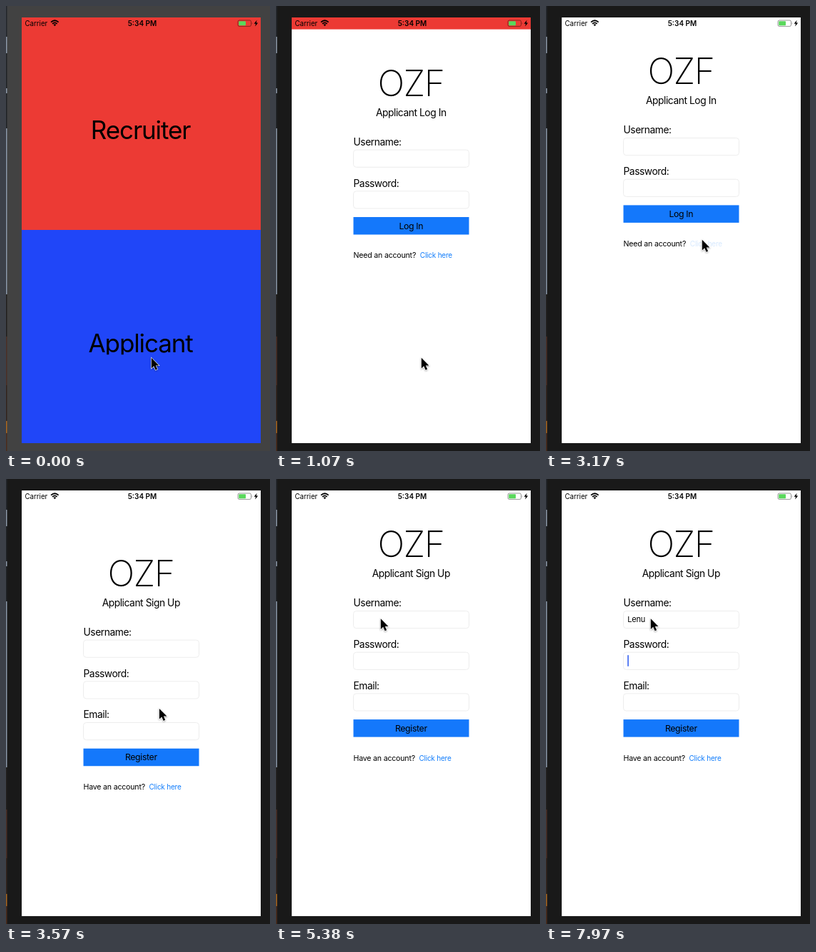
Write an HTML page that moves like this. It is 370x622 px and loops after 8 s.

```html
<!DOCTYPE html>
<html lang="en">
<head>
<meta charset="utf-8">
<title>Sign up flow</title>
<style>
  html, body { margin: 0; width: 100%; height: 100%; overflow: hidden; background: #191919; }
  svg { display: block; width: 370px; height: 622px; }
  text { font-family: Inter, "Open Sans", sans-serif; font-optical-sizing: none; fill: #000; white-space: pre; }
  .mid { text-anchor: middle; }
  .huge { font-size: 35px; letter-spacing: -1.1px; }
  .logo { font-size: 50px; font-weight: 200; letter-spacing: -1.5px; }
  .label { font-size: 13.8px; letter-spacing: -.44px; }
  .action { font-size: 12.3px; letter-spacing: -.35px; }
  .note { font-size: 10.6px; letter-spacing: -.2px; }
  .link { font-size: 10px; letter-spacing: -.22px; fill: #147efb; }
  .typed { font-size: 11px; letter-spacing: -.2px; }
  .status { font-size: 9.7px; }
  .clock { font-size: 10px; font-weight: 600; }
</style>
</head>
<body>
<svg viewBox="0 0 370 622">
  <defs>
    <clipPath id="screen"><rect x="22" y="16" width="335" height="595"/></clipPath>
    <clipPath id="half"><rect x="22" y="440" width="335" height="47.3"/></clipPath>
    <filter id="shade" x="-50%" y="-50%" width="200%" height="200%">
      <feDropShadow dx="0" dy="1" stdDeviation=".9" flood-opacity=".4"/>
    </filter>
  </defs>
  <rect id="bezel" width="370" height="622"/>
  <g id="strip"></g>
  <g clip-path="url(#screen)">
    <rect x="22" y="16" width="335" height="297.5" fill="#ec3a34"/>
    <rect x="22" y="313" width="335" height="298" fill="#2046f8"/>
    <text class="huge mid" x="188.6" y="186">Recruiter</text>
    <g clip-path="url(#half)"><text id="applicant" class="huge mid" x="188.6" y="484">Applicant</text></g>
    <g id="login"></g>
    <g id="signup"></g>
    <text class="status" x="26.5" y="28">Carrier</text>
    <g fill="none" stroke="#000" stroke-width="1.7">
      <path d="M63 22.6Q68.3 17.9 73.6 22.6M65 24.9Q68.3 21.9 71.6 24.9"/>
      <path d="M66.4 26L68.3 28.2L70.2 26Q68.3 24.6 66.4 26Z" fill="#000" stroke="none"/>
    </g>
    <text class="clock mid" x="191" y="28">5:34 PM</text>
    <rect x="325" y="20" width="18.5" height="8.4" rx="2" fill="none" stroke="#000" stroke-opacity=".45" stroke-width=".9"/>
    <rect x="326.2" y="21.2" width="9.8" height="6" rx=".8" fill="#5ad85c"/>
    <path d="M344.7 22.7Q346.3 24.2 344.7 25.7Z" fill-opacity=".45"/>
    <path d="M351.6 19.8L347.6 24.8H350L349.2 28.6L353.2 23.4H350.7Z"/>
  </g>
  <path id="cursor" d="M0 0V14.6L3.4 11.5L5.8 17L8.3 15.9L6 10.6H10.6Z" fill="#000" stroke="#fff" stroke-width="1.1" paint-order="stroke" filter="url(#shade)"/>
</svg>
<script>
const LOOP = 8000;
const NAME = "Lenu";
const KEYS = [7248, 7428, 7550, 7668];
const NEXT_FIELD = 7968;
const $ = id => document.getElementById(id);
const clamp = v => Math.max(0, Math.min(1, v));
const ramp = (t, a, b) => clamp((t - a) / (b - a));

const text = (cls, x, y, s, id = "") => `<text ${id && `id="${id}"`} class="${cls}" x="${x}" y="${y}">${s}</text>`;
const field = (label, y) => text("label", 108.5, y - 6.2, label) +
  `<rect x="108.5" y="${y}" width="162" height="24.2" rx="4" fill="#fff" stroke="#ebebeb" stroke-width=".9"/>`;

// A white sheet: heading, labelled fields, button and footer link.
function form({ title, labels, action, note, linkX, linkId }) {
  const y = 184.5 + labels.length * 57.7;
  const top = y - 21.5;
  return `<rect x="22" y="16" width="335" height="640" fill="#fff"/>` +
    text("logo mid", 189, 109, "OZF") +
    text("label mid", 189.3, 137.2, title) +
    labels.map((l, i) => field(l, 184.5 + i * 57.7)).join("") +
    `<rect x="108.5" y="${top}" width="162" height="24.5" fill="#1478fb"/>` +
    text("action mid", 189.3, top + 16.7, action) +
    text("note", 108.5, top + 57.4, note) +
    text("link", linkX, top + 57.4, "Click here", linkId);
}

$("login").innerHTML = form({
  title: "Applicant Log In", labels: ["Username:", "Password:"],
  action: "Log In", note: "Need an account?", linkX: 201.8, linkId: "toSignup"
});
$("signup").innerHTML = form({
  title: "Applicant Sign Up", labels: ["Username:", "Password:", "Email:"],
  action: "Register", note: "Have an account?", linkX: 200.4
}) + text("typed", 114.3, 200.2, "", "name") +
  `<rect id="caret" width="1.7" height="15.6" fill="#426bf2"/>`;

// Sliver of the desktop behind the window: [top, colour]
const sliver = [[0, "#23272c"], [43, "#8a96a5"], [66, "#202327"], [115, "#8a96a5"], [122, "#202327"],
  [171, "#8795a5"], [403, "#22201f"], [462, "#4a2f27"], [530, "#33241e"], [580, "#a8651f"], [597, "#4b2c1c"]];
$("strip").innerHTML = sliver.map(([y, c], i) =>
  `<rect y="${y}" width="1.5" height="${(sliver[i + 1] || [622])[0] - y}" fill="${c}"/>`).join("");

// Critically damped spring, 1 to 0.
function spring(ms) {
  const x = Math.max(0, ms) * .01826;
  const v = (1 + x) * Math.exp(-x);
  return v < .0006 ? 0 : v;
}

// Pointer path: [time, x, y]
const path = [[1150, 203, 491], [1560, 130, 321], [1680, 124, 313], [2040, 201, 291], [2790, 201, 291],
  [3120, 218, 326], [3500, 218, 326], [4030, 138, 206], [4120, 138, 206], [4270, 140, 198], [4440, 146, 194.5]];

function pointer(t) {
  const i = path.findIndex(p => p[0] > t);
  if (i === 0) return path[0].slice(1);
  if (i < 0) return path[path.length - 1].slice(1);
  const [a, b] = [path[i - 1], path[i]];
  const k = ramp(t, a[0], b[0]);
  const e = k * k * (3 - 2 * k);
  return [a[1] + (b[1] - a[1]) * e, a[2] + (b[2] - a[2]) * e];
}

function caretAlpha(t) {
  if (t < 4668) return 0;
  if (t >= KEYS[0]) return 1;
  return 1 - ramp(t, 5190, 5380) + ramp(t, 5640, 5730)
    - ramp(t, 6170, 6310) + ramp(t, 6630, 6720) - ramp(t, 7110, 7240);
}

function slide(id, t, start) {
  $(id).setAttribute("visibility", t < start ? "hidden" : "visible");
  $(id).setAttribute("transform", `translate(0 ${(595 * spring(t - start)).toFixed(2)})`);
}

// Button title dims while pressed, then fades back.
const press = (t, down, up) => t < down ? 1 : .17 + .83 * ramp(t, up, up + 400);

function render(t) {
  $("bezel").setAttribute("fill", t < 600 ? "#424242" : "#191919");
  $("applicant").setAttribute("opacity", press(t, 600, 773));
  $("toSignup").setAttribute("opacity", press(t, 3168, 3332));
  slide("login", t, 773);
  slide("signup", t, 3332);

  const [x, y] = pointer(t);
  $("cursor").setAttribute("transform", `translate(${x + .8} ${y + .8})`);

  const name = $("name");
  const typed = NAME.slice(0, KEYS.filter(k => t >= k).length);
  if (name.textContent !== typed) name.textContent = typed;
  const second = t >= NEXT_FIELD;
  const caret = $("caret");
  caret.setAttribute("x", 114.2 + (second || !typed ? 0 : name.getComputedTextLength()));
  caret.setAttribute("y", second ? 246.2 : 188.4);
  caret.setAttribute("opacity", caretAlpha(t));
}

const begin = performance.now();
function tick() {
  render((performance.now() - begin) % LOOP);
  requestAnimationFrame(tick);
}
tick();
</script>
</body>
</html>
```
